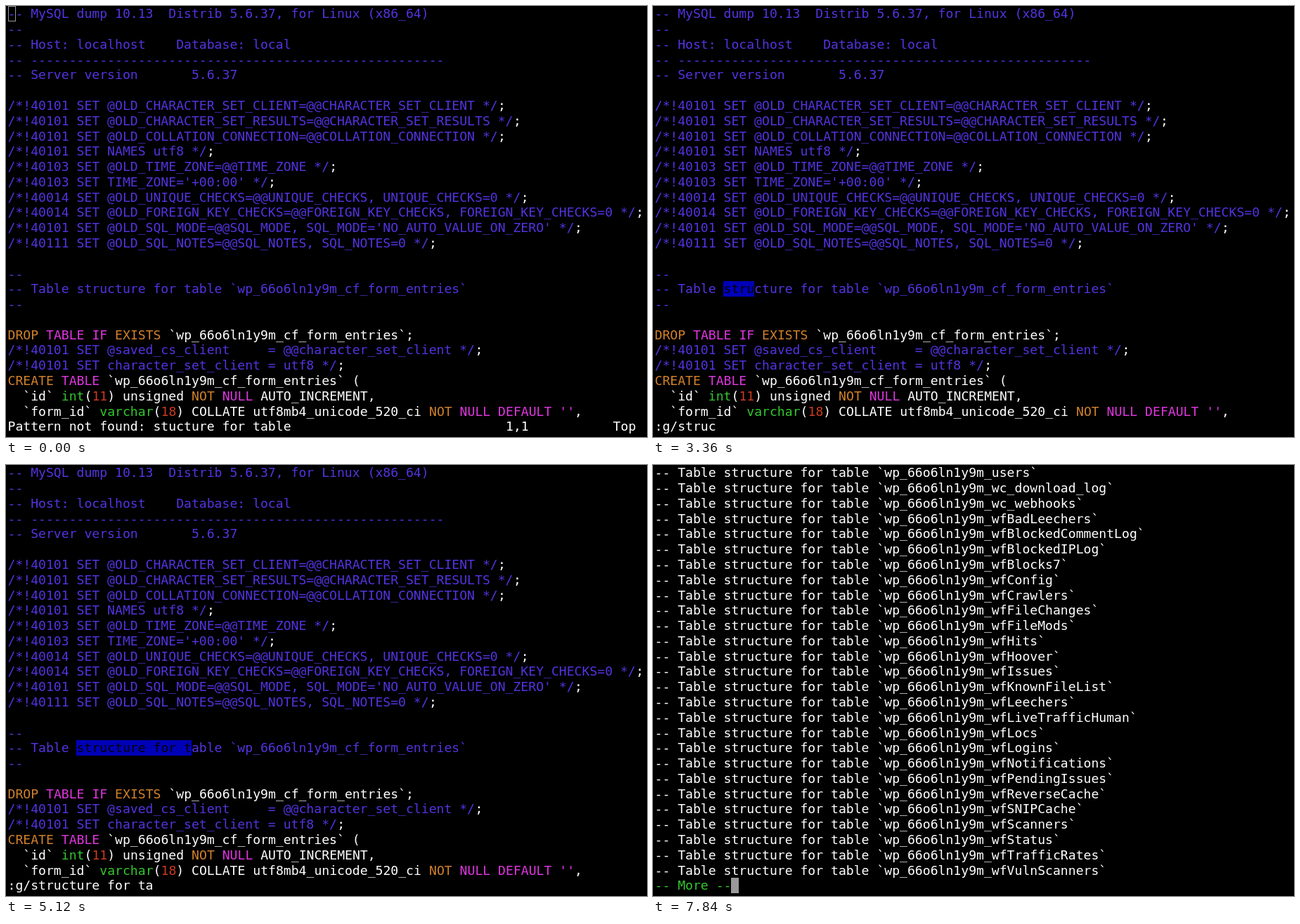
Recreate the animation shown at these times as an HTML page with a canvas. Size 912 by 614 pixels, loop 8000 ms.

```html
<!DOCTYPE html>
<html lang="en">
<head>
<meta charset="utf-8">
<title>Searching a SQL dump</title>
<style>
html, body { margin: 0; width: 100%; height: 100%; overflow: hidden; background: #000; }
canvas { display: block; width: 912px; height: 614px; }
</style>
</head>
<body>
<canvas id="terminal" width="912" height="614"></canvas>
<script>
const ctx = document.getElementById('terminal').getContext('2d');
const LOOP = 8000, COL = 10.9, ROW = 21.78, LEFT = 2.5, LAST = 27;
const COLOR = {
  text: '#ffffff', comment: '#5433e0', statement: '#d2812a', keyword: '#df36df',
  type: '#33c72e', number: '#cb3a20', cursor: '#999999', match: '#0000b8'
};

const TABLE = 'wp_66o6ln1y9m_';
const dump = `-- MySQL dump 10.13  Distrib 5.6.37, for Linux (x86_64)
--
-- Host: localhost    Database: local
-- ${'-'.repeat(54)}
-- Server version       5.6.37

/*!40101 SET @OLD_CHARACTER_SET_CLIENT=@@CHARACTER_SET_CLIENT */;
/*!40101 SET @OLD_CHARACTER_SET_RESULTS=@@CHARACTER_SET_RESULTS */;
/*!40101 SET @OLD_COLLATION_CONNECTION=@@COLLATION_CONNECTION */;
/*!40101 SET NAMES utf8 */;
/*!40103 SET @OLD_TIME_ZONE=@@TIME_ZONE */;
/*!40103 SET TIME_ZONE='+00:00' */;
/*!40014 SET @OLD_UNIQUE_CHECKS=@@UNIQUE_CHECKS, UNIQUE_CHECKS=0 */;
/*!40014 SET @OLD_FOREIGN_KEY_CHECKS=@@FOREIGN_KEY_CHECKS, FOREIGN_KEY_CHECKS=0 */;
/*!40101 SET @OLD_SQL_MODE=@@SQL_MODE, SQL_MODE='NO_AUTO_VALUE_ON_ZERO' */;
/*!40111 SET @OLD_SQL_NOTES=@@SQL_NOTES, SQL_NOTES=0 */;

--
-- Table structure for table \`${TABLE}cf_form_entries\`
--

DROP TABLE IF EXISTS \`${TABLE}cf_form_entries\`;
/*!40101 SET @saved_cs_client     = @@character_set_client */;
/*!40101 SET character_set_client = utf8 */;
CREATE TABLE \`${TABLE}cf_form_entries\` (
  \`id\` int(11) unsigned NOT NULL AUTO_INCREMENT,
  \`form_id\` varchar(18) COLLATE utf8mb4_unicode_520_ci NOT NULL DEFAULT '',`.split('\n');

const expand = names => names.split(' ').map(n => `-- Table structure for table \`${TABLE}${n}\``);
const COMMAND = ':g/structure for table/p';
const pageOne = [COMMAND, ...expand('cf_form_entries cf_form_entry_meta cf_form_entry_values ' +
  'cf_forms cf_pro_messages cf_tracking cf_tracking_meta commentmeta comments csshero3 links ' +
  'loginizer_logs nextend2_image_storage nextend2_section_storage nextend2_smartslider3_generators ' +
  'nextend2_smartslider3_sliders nextend2_smartslider3_sliders_xref nextend2_smartslider3_slides ' +
  'options postmeta posts term_relationships term_taxonomy termmeta terms usermeta')];
const pageTwo = expand('users wc_download_log wc_webhooks wfBadLeechers wfBlockedCommentLog ' +
  'wfBlockedIPLog wfBlocks7 wfConfig wfCrawlers wfFileChanges wfFileMods wfHits wfHoover wfIssues ' +
  'wfKnownFileList wfLeechers wfLiveTrafficHuman wfLocs wfLogins wfNotifications wfPendingIssues ' +
  'wfReverseCache wfSNIPCache wfScanners wfStatus wfTrafficRates wfVulnScanners');

const SYNTAX = new RegExp([
  '(?<comment>--.*|/\\*.*?\\*/)', '(?<statement>\\b(?:DROP|CREATE|EXISTS|NOT)\\b)',
  "(?<keyword>\\b(?:TABLE|IF|NULL|DEFAULT)\\b|'[^']*')",
  '(?<type>\\b(?:int|varchar)\\b)', '(?<number>\\b\\d+\\b)'
].join('|'), 'g');

// Each key press: time and number of command characters shown from then on.
const KEYS = [[1600, 1], [1920, 2], [2400, 3], [2560, 4], [2720, 5], [2880, 6], [3040, 7],
  [3360, 8], [3520, 9], [3680, 10], [3840, 11], [4000, 12], [4160, 13], [4480, 14],
  [4640, 16], [4800, 17], [4960, 18], [5120, 19], [5280, 21], [5440, 22], [5600, 23], [5920, 24]];
const PATTERN_START = 3, PATTERN_END = 22;

const colX = col => LEFT + col * COL;
const rowY = row => Math.round(row * ROW + 0.3);

function write(text, col, row, color = COLOR.text) {
  ctx.fillStyle = color;
  ctx.fillText(text, colX(col), rowY(row) + 17);
}

function block(col, row, cells, color) {
  const left = Math.round(colX(col) - 0.4);
  const right = Math.round(colX(col + cells) - 0.4);
  ctx.fillStyle = color;
  ctx.fillRect(left, rowY(row), right - left, rowY(row + 1) - rowY(row));
}

const cursor = (col, row) => block(col, row, 1, COLOR.cursor);

function writeSql(line, row) {
  let at = 0;
  for (const m of line.matchAll(SYNTAX)) {
    write(line.slice(at, m.index), at, row);
    const kind = Object.keys(m.groups).find(k => m.groups[k] !== undefined);
    write(m[0], m.index, row, COLOR[kind]);
    at = m.index + m[0].length;
  }
  write(line.slice(at), at, row);
}

function highlight(pattern) {
  const row = dump.findIndex(line => line.includes(pattern));
  const col = dump[row].indexOf(pattern);
  block(col, row, pattern.length, COLOR.match);
  write(pattern, col, row, '#000');
}

function drawStatus(focused) {
  write('Pattern not found: stucture for table', 0, LAST);
  write('1,1', 65, LAST);
  write('Top', 79, LAST);
  if (focused) {
    cursor(0, 0);
    write('-', 0, 0, '#000');
  } else {
    ctx.strokeStyle = COLOR.cursor;
    ctx.strokeRect(3.5, 0.5, 10, 21);
  }
}

function drawCommand(t) {
  const step = KEYS.findLastIndex(k => t >= k[0]);
  const typed = KEYS[step][1];
  // While typing, the match trails the pattern by one character.
  const matched = typed < PATTERN_END ? typed - 1 : PATTERN_END;
  const pattern = COMMAND.slice(PATTERN_START, matched);
  if (matched > PATTERN_START) highlight(pattern);
  write(COMMAND.slice(0, typed), 0, LAST);
  if (typed <= PATTERN_START || typed > PATTERN_END) cursor(typed, LAST);
}

function drawEditor(t) {
  dump.forEach(writeSql);
  if (t < KEYS[0][0]) drawStatus(t >= 160);
  else drawCommand(t);
}

function drawPage(lines) {
  lines.forEach((line, row) => write(line, 0, row));
  write('-- More --', 0, LAST, COLOR.type);
  cursor(10, LAST);
}

function draw(t) {
  ctx.fillStyle = '#000';
  ctx.fillRect(0, 0, 912, 614);
  ctx.font = '18.1px "DejaVu Sans Mono", monospace';
  if (t < 6560) drawEditor(t);
  else drawPage(t < 7840 ? pageOne : pageTwo);
}

const startTime = performance.now();
function tick() {
  draw((performance.now() - startTime) % LOOP);
  requestAnimationFrame(tick);
}
tick();
</script>
</body>
</html>
```
